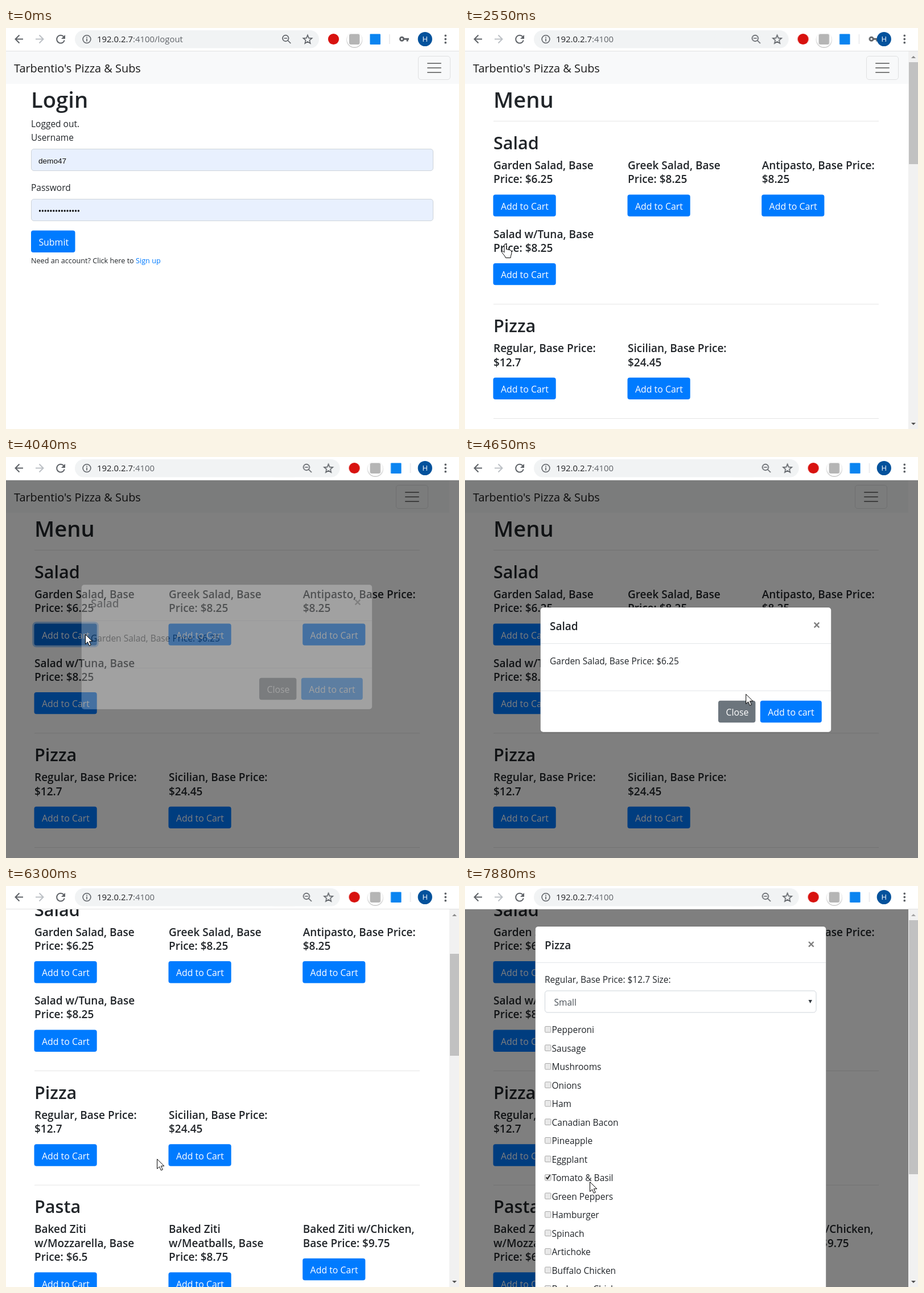
An HTML page for the animation above (8 s loop, 796x704 px).

```html
<!DOCTYPE html>
<html lang="en">
<head>
<meta charset="utf-8">
<title>Ordering demo</title>
<style>
html, body { margin: 0; width: 100%; height: 100%; overflow: hidden; background: #fff; }
svg { display: block; width: 796px; height: 704px; }
text { font: 15.5px "Open Sans", sans-serif; fill: #212529; white-space: pre; }
.h1 { font-size: 38.2px; font-weight: 600; }
.h2 { font-size: 30.6px; font-weight: 600; }
.h5 { font-size: 19px; font-weight: 600; }
.brand { font-size: 19.9px; fill: #1a1a1a; }
.small { font-size: 12.65px; }
.link { fill: #007bff; }
.label { font-size: 15.9px; fill: #fff; }
.field { font: 13.6px "Liberation Sans", sans-serif; fill: #111; }
.choice { fill: #495057; }
.url { font-size: 14.9px; fill: #202124; }
.url tspan { fill: #5f6368; }
.initial { font-size: 13px; fill: #fff; text-anchor: middle; }
.line { fill: none; stroke: #5f6368; stroke-width: 2; }
.btn { fill: #007bff; stroke: #007bff00; stroke-width: 6.4; paint-order: stroke; }
.grey { fill: #6c757d; }

/* One loop is 8 s, so 1% is 80 ms. */
.login, .path, .wait, .reload, .toggler, .scrollbar, .tick { animation: 8s step-end infinite; }
.scroll, .thumb, .backdrop, .modal, .slide, .shift, .key, .pointer, .btn { animation: 8s linear infinite; }

.login { animation-name: login; }
@keyframes login { 0% { opacity: 1 } 30.875%, 100% { opacity: 0 } }
.path { animation-name: path; }
@keyframes path { 0% { fill-opacity: 1 } 30.875%, 100% { fill-opacity: 0 } }
.wait { animation-name: wait; }
@keyframes wait { 0%, 30.875%, 68% { opacity: 0 } 27.06%, 65.25% { opacity: 1 } 100% { opacity: 0 } }
.reload { animation-name: reload; }
@keyframes reload { 0%, 30.875%, 68% { opacity: 1 } 27.06%, 65.25% { opacity: 0 } 100% { opacity: 1 } }

.shift { animation-name: shift; }
@keyframes shift { 0%, 30.875% { transform: none } 31.875% { transform: translateX(18.3px) } 32.9%, 100% { transform: translateX(36.6px) } }
.key { animation-name: key; }
@keyframes key { 0%, 31.9% { opacity: 1 } 32.9%, 100% { opacity: 0 } }

.toggler { animation-name: toggler; }
@keyframes toggler { 0%, 68% { transform: translateX(-19px) } 48.1% { transform: translateX(-39px) } 100% { transform: translateX(-19px) } }
.scrollbar { animation-name: scrollbar; }
@keyframes scrollbar { 0%, 68% { opacity: 1 } 48.1%, 84.7% { opacity: 0 } 100% { opacity: 0 } }
.scroll { animation-name: scroll; }
@keyframes scroll { 0%, 72.2% { transform: none; animation-timing-function: ease-in-out } 76.2%, 100% { transform: translateY(-160.4px) } }
.thumb { animation-name: thumb; }
@keyframes thumb { 0%, 72.2% { transform: none; animation-timing-function: ease-in-out } 76.2%, 100% { transform: translateY(59px) } }

.backdrop { animation-name: backdrop; }
@keyframes backdrop {
  0%, 48.125% { opacity: 0 } 50%, 67.99% { opacity: .5 }
  68%, 84.7% { opacity: 0 } 86.56%, 100% { opacity: .5 }
}
.salad { animation-name: salad-fade; }
@keyframes salad-fade { 0%, 50% { opacity: 0 } 51.9%, 67.99% { opacity: 1 } 68%, 100% { opacity: 0 } }
.salad .slide { animation-name: salad-slide; }
@keyframes salad-slide { 0%, 50% { transform: translateY(-51px); animation-timing-function: ease-out } 53.75%, 100% { transform: none } }
.pizza { animation-name: pizza-fade; }
@keyframes pizza-fade { 0%, 86.56% { opacity: 0 } 88.44%, 100% { opacity: 1 } }
.pizza .slide { animation-name: pizza-slide; }
@keyframes pizza-slide { 0%, 86.56% { transform: translateY(-51px); animation-timing-function: ease-out } 90.3%, 100% { transform: none } }
.tick { animation-name: tick; }
@keyframes tick { 0% { opacity: 0 } 94.5%, 100% { opacity: 1 } }

.submit { animation-name: submit; }
@keyframes submit {
  0%, 16.8% { fill: #007bff } 18.6%, 26% { fill: #0069d9; stroke: #007bff00 }
  27%, 100% { fill: #0062cc; stroke: #007bff80 }
}
.garden { animation-name: garden; }
@keyframes garden {
  0%, 40.6% { fill: #007bff } 42.5%, 46.2% { fill: #0069d9; stroke: #007bff00 }
  47.3%, 50% { fill: #0062cc; stroke: #007bff80 } 52%, 100% { fill: #007bff; stroke: #007bff00 }
}
.confirm { animation-name: confirm; }
@keyframes confirm {
  0%, 59.3% { fill: #007bff } 61.2%, 64% { fill: #0069d9; stroke: #007bff00 }
  65.25%, 100% { fill: #0062cc; stroke: #007bff80 }
}
.regular { animation-name: regular; }
@keyframes regular {
  0%, 81.3% { fill: #007bff } 83.1%, 83.5% { fill: #0069d9; stroke: #007bff00 }
  84.6%, 88% { fill: #0062cc; stroke: #007bff80 } 90%, 100% { fill: #007bff; stroke: #007bff00 }
}

.pointer { animation-name: move; }
@keyframes move {
  0%, 2.61% { opacity: 0; transform: translate(704px, 664px) }
  2.62% { opacity: 1; transform: translate(704px, 664px); animation-timing-function: ease-out }
  5.4%, 12.5% { transform: translate(203px, 253px); animation-timing-function: ease-in-out }
  19.2%, 36.8% { transform: translate(70px, 379px); animation-timing-function: ease-in-out }
  43.5%, 56.3% { transform: translate(139px, 311px) }
  58.1% { transform: translate(491px, 415px); animation-timing-function: ease-out }
  60.5%, 75.6% { transform: translate(572px, 447px) }
  78.75% { transform: translate(266px, 479px); animation-timing-function: ease-out }
  82.4%, 90.3% { transform: translate(116px, 463px); animation-timing-function: ease-in-out }
  93.4%, 95% { transform: translate(145px, 510px) }
  97.3% { transform: translate(225px, 529px) }
  98.4%, 100% { opacity: 1; transform: translate(219px, 519px) }
}
.shape { --hand: 0; animation: shape 8s step-end infinite; }
@keyframes shape {
  0%, 32.4%, 48.1%, 68%, 88% { --hand: 0 }
  16.8%, 40.6%, 59.3%, 81.3% { --hand: 1 }
  100% { --hand: 0 }
}
.shape path { fill: #fff; stroke: #000; stroke-linejoin: round; }
.hand { opacity: var(--hand); }
.arrow { opacity: calc(1 - var(--hand)); }
</style>
</head>
<body>
<svg id="stage" viewBox="0 0 796 704"></svg>
<script>
const text = (x, y, content, cls = '') => `<text x="${x}" y="${y}" class="${cls}">${content}</text>`;
const rect = (x, y, w, h, attrs = '') => `<rect x="${x}" y="${y}" width="${w}" height="${h}" ${attrs}/>`;
const path = (d, attrs = 'class="line"') => `<path d="${d}" ${attrs}/>`;
const group = (cls, ...parts) => `<g class="${cls}">${parts.join('')}</g>`;
const rule = (x, y, w, color = '#e5e5e5') => rect(x, y, w, 1, `fill="${color}"`);
const button = (x, y, w, label, cls = '') =>
  rect(x, y, w, 38.4, `rx="4" class="btn ${cls}"`) + text(x + 13.4, y + 26.4, label, 'label');
const box = (x, y, w, fill, stroke = '#ced4da') =>
  rect(x, y, w, 38, `rx="4.5" fill="${fill}" stroke="${stroke}"`);

const nav = (cls) => rect(0, 41, 779, 57, 'fill="#f8f9fa"') +
  text(14, 78, "Tarbentio's Pizza &amp; Subs", 'brand') +
  group(cls,
    rect(724.5, 49.5, 56, 41, 'rx="4.5" fill="none" stroke="#dfe0e1"'),
    path('M741 62h23m-23 8h23m-23 8h23', 'stroke="#7c7d7d" stroke-width="2" stroke-linecap="round"'));

const columns = [50, 286, 521.7];
const item = (column, y, lines, cls) => {
  const x = columns[column];
  return lines.map((line, i) => text(x, y + i * 24.4, line, 'h5')).join('') +
    button(x - 0.5, y + (lines.length - 1) * 24.4 + 20, 110.2, 'Add to Cart', cls);
};

const menu = group('scroll',
  nav('toggler'),
  text(50, 139.6, 'Menu', 'h1'),
  rule(50, 163, 677),
  text(50, 213, 'Salad', 'h2'),
  item(0, 248, ['Garden Salad, Base', 'Price: $6.25'], 'garden'),
  item(1, 248, ['Greek Salad, Base', 'Price: $8.25']),
  item(2, 248, ['Antipasto, Base Price:', '$8.25']),
  item(0, 368.5, ['Salad w/Tuna, Base', 'Price: $8.25']),
  rule(50, 484.4, 677),
  text(50, 534, 'Pizza', 'h2'),
  item(0, 569.3, ['Regular, Base Price:', '$12.7'], 'regular'),
  item(1, 569.3, ['Sicilian, Base Price:', '$24.45']),
  rule(50, 685, 677),
  text(50, 734.5, 'Pasta', 'h2'),
  item(0, 769.8, ['Baked Ziti', 'w/Mozzarella, Base', 'Price: $6.5']),
  item(1, 769.8, ['Baked Ziti', 'w/Meatballs, Base', 'Price: $8.75']),
  item(2, 769.8, ['Baked Ziti w/Chicken,', 'Base Price: $9.75']));

const scrollbar = (cls, length) => group(cls,
  rect(779, 41, 17, 663, 'fill="#f1f1f1"'),
  rect(780, 60, 16, length, 'class="thumb" fill="#c1c1c1"'),
  path('M784 53l4-4 4 4z', 'fill="#8b8b8b"'),
  path('M784 693l4 4 4-4z', 'fill="#505050"'));

const login = group('login',
  rect(0, 41, 796, 663, 'fill="#fff"'),
  rect(779, 41, 17, 57, 'fill="#f8f9fa"'),
  nav(''),
  text(44, 139.6, 'Login', 'h1'),
  text(44, 174, 'Logged out.'),
  text(44, 198.4, 'Username'),
  box(44.5, 212.5, 706, '#e8f0fe'),
  text(57, 238, 'demo47', 'field'),
  text(44, 286.4, 'Password'),
  box(44.5, 300.5, 706, '#e8f0fe'),
  path('M59.5 321h68.5', 'stroke="#000" stroke-width="3.3" stroke-linecap="round" stroke-dasharray="0 4.85"'),
  button(44, 355.6, 77.5, 'Submit', 'submit'),
  text(44, 413.3, 'Need an account? Click here to <tspan class="link">Sign up</tspan>', 'small'));

const cross = (x, y) => path(`M${x - 4.3} ${y - 4.3}l8.6 8.6m0-8.6l-8.6 8.6`, 'stroke="#7f7f7f" stroke-width="2.4"');
const panel = (x, y, h) => rect(x, y, 511, h, 'rx="5" fill="#fff" stroke="#0003"');

const saladModal = group('modal salad', group('slide',
  panel(132.5, 264, 219),
  text(149, 303.5, 'Salad', 'h5'),
  cross(618, 295),
  rule(133, 327, 510, '#e3e6e9'),
  text(149, 363.7, 'Garden Salad, Base Price: $6.25'),
  rule(133, 410, 510, '#e3e6e9'),
  button(445, 427.8, 65.4, 'Close', 'grey'),
  button(518.8, 427.8, 108, 'Add to cart', 'confirm')));

const toppings = ['Pepperoni', 'Sausage', 'Mushrooms', 'Onions', 'Ham', 'Canadian Bacon', 'Pineapple',
  'Eggplant', 'Tomato &amp; Basil', 'Green Peppers', 'Hamburger', 'Spinach', 'Artichoke',
  'Buffalo Chicken', 'Barbecue Chicken', 'Anchovies'];
const topping = (label, i) => {
  const y = 258 + i * 32.5;
  return rect(140.5, y - 11.5, 10.5, 10.5, 'rx="1.5" fill="#e9e9e9" stroke="#a9a9a9"') + text(152.5, y, label);
};

const pizzaModal = group('modal pizza',
  rect(779, 41, 17, 663, 'fill="#f1f1f1"'),
  rect(780, 60, 16, 446, 'fill="#c1c1c1"'),
  path('M784 53l4-4 4 4z', 'fill="#a3a3a3"'),
  path('M784 693l4 4 4-4z', 'fill="#505050"'),
  group('slide',
    panel(123.5, 71, 760),
    text(140, 110.5, 'Pizza', 'h5'),
    cross(608.3, 102.3),
    rule(124, 134, 510, '#e3e6e9'),
    text(140, 170, 'Regular, Base Price: $12.7 Size:'),
    box(140.5, 184, 476.5, '#fff'),
    text(156.5, 210, 'Small', 'choice'),
    path('M603.5 200h6.4l-3.2 6z', 'fill="#343a40"'),
    toppings.map(topping).join(''),
    path('M142.6 511.5l2.3 2.6 4.4-6.6', 'class="tick" fill="none" stroke="#222" stroke-width="2"')));

const star = Array.from({ length: 10 }, (_, i) => {
  const angle = i * Math.PI / 5, radius = i % 2 ? 3.5 : 8;
  return `${530 + radius * Math.sin(angle)},${20.5 - radius * Math.cos(angle)}`;
}).join(' ');

const toolbar = group('toolbar',
  rect(0, 0, 796, 40, 'fill="#fff"'),
  rule(0, 40, 796, '#e1e1e1'),
  path('M30 19.5H17m6.5-7l-7 7 7 7'),
  path('M52 19.5h13m-6.5-7l7 7-7 7', 'class="line" style="stroke:#bdc1c6"'),
  group('reload',
    path('M101.3 15.2A6.9 6.9 0 1 0 102.7 21.5'),
    path('M104 12v7h-7z', 'fill="#5f6368"')),
  group('wait', path('M90.5 14l11 11m0-11l-11 11')),
  rect(121, 4, 400, 31.5, 'rx="15.75" fill="#f1f3f4"'),
  group('shift',
    rect(420, 4, 130, 31.5, 'rx="15.75" fill="#f1f3f4"'),
    '<circle cx="491.3" cy="18" r="5.3" class="line" style="stroke-width:1.7"/>',
    path('M488.5 18h5.6m1.2 4l5 5', 'class="line" style="stroke-width:1.7"'),
    `<polygon points="${star}" class="line" style="stroke-width:1.6"/>`,
    '<circle cx="575.5" cy="19.5" r="9.6" fill="#d8120f"/>',
    '<circle cx="612.3" cy="21" r="14" fill="#ccc"/><circle cx="612.3" cy="20" r="13.3" fill="#fff"/>',
    rect(603, 10.5, 18.5, 18.5, 'rx="3" fill="#b5b5b5"'),
    rect(639.5, 10.5, 18.5, 18.5, 'rx="1" fill="#0a84f0"'),
    rect(673.5, 11, 1, 17, 'fill="#dadce0"'),
    group('key',
      '<circle cx="695.6" cy="19.2" r="3.1" class="line" style="stroke-width:2.8"/>',
      path('M699 19.2h9m-2.8 0v4.2', 'class="line" style="stroke-width:3"'))),
  '<circle cx="142" cy="19.6" r="6.9" class="line" style="stroke-width:1.6"/>',
  path('M142 18.6v4.8m0-7.8v1.7', 'class="line" style="stroke-width:1.7"'),
  text(160, 25.4, '192.0.2.7<tspan>:4100</tspan><tspan class="path">/logout</tspan>', 'url'),
  '<circle cx="736.3" cy="19.5" r="12.6" fill="#04529c"/>',
  text(736.3, 24.2, 'H', 'initial'),
  path('M772.3 13.3v13', 'stroke="#5f6368" stroke-width="3.8" stroke-linecap="round" stroke-dasharray="0 6.2"'));

const pointer = group('pointer', group('shape',
  path('M.5 .5v17l4-3.7 2.8 6.4 2.9-1.2-2.8-6.3h5.4z', 'class="arrow"'),
  path('M-1 2.2a1.9 1.9 0 0 1 3.8 0v7.3l6.2 1.2q3 .8 3 3.4c0 4-1.6 6-2 10.4h-8.6c-1-3.6-4-5.6-6.3-9.3-1.2-2 1-3.2 2.6-1.6l1.3 1.4z', 'class="hand"')));

document.getElementById('stage').innerHTML = [
  menu,
  scrollbar('scrollbar', 179),
  login,
  rect(0, 41, 796, 663, 'class="backdrop"'),
  saladModal,
  pizzaModal,
  toolbar,
  pointer
].join('');
</script>
</body>
</html>
```
